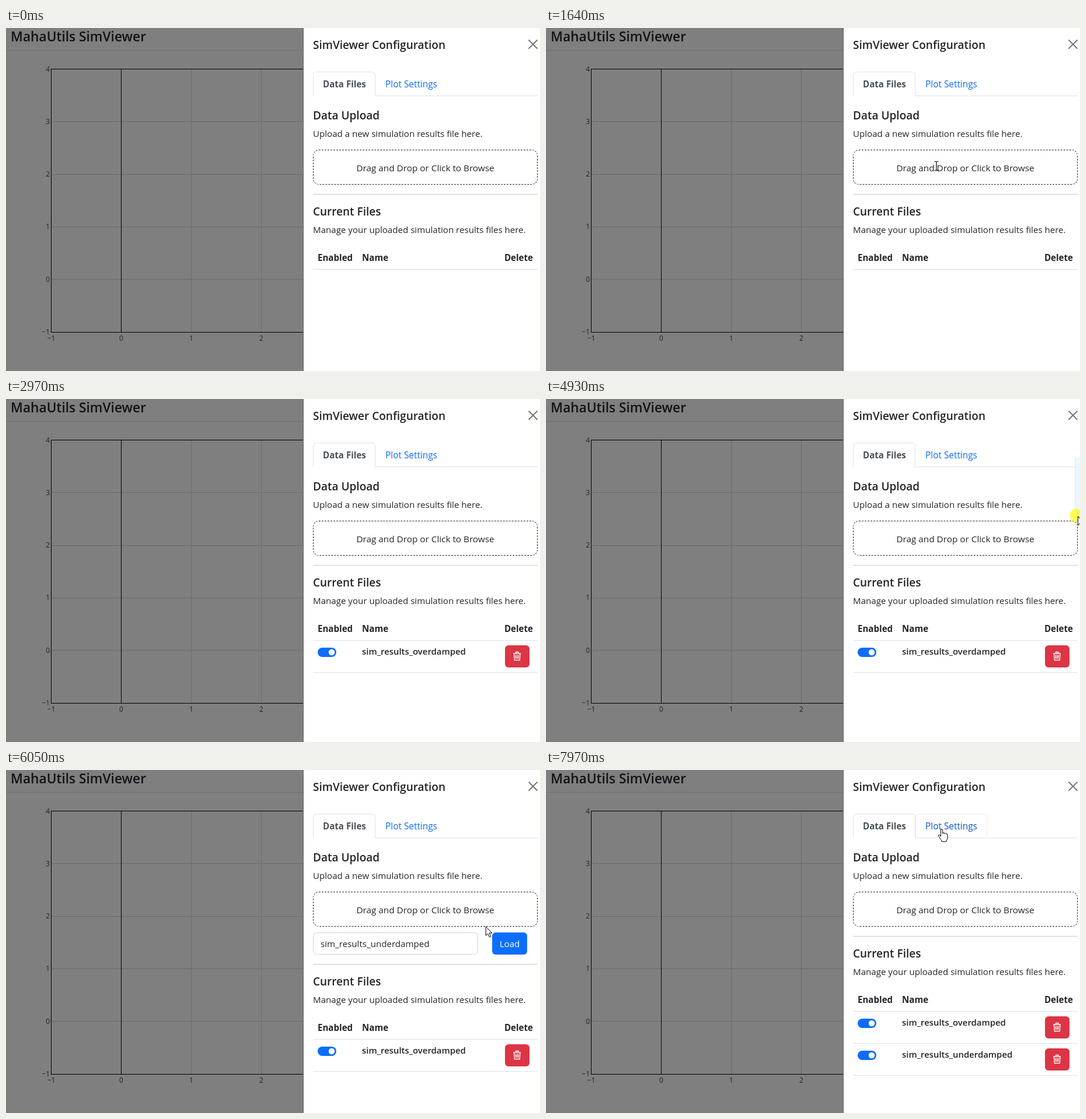
Recreate the animation shown at these times as an HTML page. Size 915 by 589 pixels, loop 8000 ms.

```html
<!DOCTYPE html>
<html lang="en">
<head>
<meta charset="utf-8">
<title>SimViewer Configuration</title>
<style>
  html, body { margin: 0; width: 100%; height: 100%; overflow: hidden; background: #fff; }
  svg { display: block; width: 915px; height: 589px; }
  text { font: 15.1px "Open Sans", "Noto Sans", sans-serif; fill: #212529; }
  .title { font-size: 22.7px; font-weight: 600; fill: #111315; }
  .head { font-size: 19px; font-weight: 600; }
  .bold { font-weight: 700; }
  .name { font-size: 14.9px; font-weight: 600; }
  .axes text { font-size: 12px; fill: #222; }
  .mid { text-anchor: middle; }
  .line { stroke: #dee2e6; fill: none; }
  .cursor { fill: #fff; stroke: #000; }
  #zone { box-sizing: border-box; height: 60px; border: 1px dashed #212529; border-radius: 10px; }
  #zone.hot { border: 1px solid #6c6; background: #eee; }
</style>
</head>
<body>
<svg viewBox="0 0 915 589">
  <defs>
    <g id="row">
      <rect x="534" y="427" width="32" height="16" rx="8" fill="#0d6efd"/>
      <circle cx="558" cy="435" r="5.25" fill="#fff"/>
      <rect x="855" y="423" width="42" height="38" rx="6" fill="#dc3545"/>
      <path d="M869 437h13M873.500 437v-2.500h4.500v2.500M870.500 437l.8 11.500h8.900l.8-11.500M873.200 439.500l.3 6.500M875.700 439.500v6.500M878.200 439.500l-.3 6.500"
            fill="none" stroke="#fff" stroke-width="1.300"/>
      <path class="line" d="M526 469.5h385"/>
    </g>
  </defs>

  <rect width="510" height="589" fill="#7f7f7f"/>
  <text class="title" x="8" y="22.500">MahaUtils SimViewer</text>
  <path d="M0 38.5h510" stroke="#6f6f6f"/>
  <g id="axes" class="axes"></g>
  <path d="M509.500 0V589" stroke="#666"/>
  <rect x="510" width="405" height="589" fill="#fff"/>

  <text class="head" x="526" y="36">SimViewer Configuration</text>
  <path d="M895.5 20.5l15 15m0-15l-15 15" stroke="#777" stroke-width="2"/>
  <path class="line" d="M526.5 117V81.500q0-6 6-6h94q6 0 6 6v35H911"/>
  <path id="tab" d="M633.500 116V81.500q0-6 6-6h110q6 0 6 6v35" fill="none" stroke="#e9ecef"/>
  <text class="bold" x="543" y="102" style="fill:#495057">Data Files</text>
  <text id="link" x="650" y="102" style="font-size:15.4px">Plot Settings</text>

  <text class="head" x="526" y="157">Data Upload</text>
  <text x="526" y="187">Upload a new simulation results file here.</text>
  <foreignObject x="526" y="209" width="385" height="60"><div id="zone"></div></foreignObject>
  <text class="mid" x="718.5" y="246" style="font-size:15.3px">Drag and Drop or Click to Browse</text>

  <g id="loader">
    <rect x="526.5" y="279.5" width="282" height="37" rx="6" fill="#fff" stroke="#ced4da"/>
    <text id="file" x="539" y="304"></text>
    <rect id="load" x="833" y="279" width="60" height="38" rx="6"/>
    <text class="mid" x="863" y="304" style="fill:#fff">Load</text>
  </g>

  <g id="files">
    <path d="M526 285.5h385" stroke="#c8c9ca"/>
    <text class="head" x="526" y="322">Current Files</text>
    <text x="526" y="352">Manage your uploaded simulation results files here.</text>
    <text class="bold" x="534" y="400">Enabled</text>
    <text class="bold" x="610" y="400">Name</text>
    <text class="bold" x="903" y="400" text-anchor="end">Delete</text>
    <path class="line" d="M526 414.5h385"/>
    <g id="over"><use href="#row"/><text class="name" x="610" y="439">sim_results_overdamped</text></g>
    <g id="under"><use href="#row" y="55"/><text class="name" x="610" y="494">sim_results_underdamped</text></g>
  </g>

  <rect id="ghost" width="74" height="92" fill="#e5f5fc" stroke="#d0e9f5" opacity=".75"/>
  <g id="pointer">
    <circle id="press" cx="-2" cy="-1" r="11.500" fill="#ff0" opacity=".7"/>
    <path id="arrow" class="cursor" d="M.5 .5v15.500l3.500-3.400 2.700 5.900 2.400-1.100-2.700-5.800h4.800z"/>
    <path id="ibeam" d="M-3.500-7.500h3l.5.5.5-.5h3M0-7V7M-3.500 7.500h3l.5-.5.5.5h3" fill="none" stroke="#000" stroke-width="1.200"/>
    <path id="hand" class="cursor" d="M-1.500 13V2q0-1.500 1.600-1.500T1.700 2v6q.2-1.300 1.500-1.300T4.700 8.300q.3-1.100 1.500-1t1.400 1.500q2.400-.6 2.400 1.700v5q0 3-2 4.500v2h-8v-2q-1.500-1-2.600-3.500l-2.700-4q-1-2 .5-2.300 1.200-.1 3.300 2.800z"/>
  </g>
</svg>
<script>
const $ = id => document.getElementById(id);
const show = (id, on) => $(id).style.display = on ? "" : "none";

function drawAxes() {
  let out = "";
  const label = n => String(n).replace("-", "−");
  for (let i = 0; i < 6; i++) {
    const y = 522 - i * 90.3;
    out += `<path d="M78 ${Math.floor(y) + .5}H510" stroke="#6b6b6b"/>
      <text x="75" y="${y + 4}" text-anchor="end">${label(i - 1)}</text>`;
  }
  for (let i = 0; i < 4; i++) {
    const x = 77.5 + i * 120;
    out += `<path d="M${x} 70V522" stroke="${i < 2 ? "#000" : "#6b6b6b"}"/>
      <text class="mid" x="${x}" y="537">${label(i - 1)}</text>`;
  }
  $("axes").innerHTML = out + '<path d="M77 70.500H510M77 522.500H510" stroke="#000"/>';
}

// Pointer stops: time, x, y
const stops = [
  [730, 800, 228], [1150, 669, 237], [1660, 669, 237], [2350, 858, 296],
  [2560, 858, 296], [2780, 889, 276], [2930, 889, 276], [2950, 893, 278],
  [4930, 911, 201], [5170, 770, 232], [5660, 770, 232], [6360, 858, 294],
  [7040, 858, 294], [7200, 852, 328], [7760, 678, 105], [7850, 678, 105], [7940, 678, 101]
];

function pointerAt(t) {
  const next = stops.findIndex(s => s[0] > t);
  if (next < 1) return stops[next ? stops.length - 1 : 0].slice(1);
  const [t0, x0, y0] = stops[next - 1], [t1, x1, y1] = stops[next];
  const u = (t - t0) / (t1 - t0), k = u * u * (3 - 2 * u);
  return [x0 + (x1 - x0) * k, y0 + (y1 - y0) * k];
}

function render(t) {
  const during = (a, b) => t >= a && t < b;
  const [x, y] = pointerAt(t);
  const inside = (l, top, r, b) => x >= l && x <= r && y >= top && y <= b;
  const visible = during(730, 2970) || t >= 4930;
  const dragging = during(730, 1580) || during(4930, 5560);
  const hot = (dragging && y >= 209) || during(5560, 5700);
  const loading = during(1720, 2770) || during(5800, 6690);
  const onLoad = loading && inside(833, 279, 893, 317);
  const onText = inside(601, 226, 837, 254) || (loading && inside(526, 279, 809, 317));
  const kind = dragging ? "arrow" : onLoad || y < 117 ? "hand" : onText ? "ibeam" : "arrow";

  $("zone").className = hot ? "hot" : "";
  show("loader", loading);
  $("file").textContent = t < 4000 ? "sim_results_overdamped" : "sim_results_underdamped";
  $("load").setAttribute("fill", onLoad ? "#0b5ed7" : "#0d6efd");
  $("files").setAttribute("transform", `translate(0 ${loading ? 48 : 0})`);
  show("over", t >= 2680);
  show("under", t >= 6620);

  const hover = Math.min(1, Math.max(0, (t - 7850) / 110));
  $("tab").style.opacity = hover;
  $("link").style.fill = `rgb(${13 - 3 * hover},${110 - 22 * hover},${253 - 51 * hover})`;

  show("ghost", dragging);
  $("ghost").setAttribute("transform", `translate(${x - 4.5} ${y - (hot ? 94 : 99.5)})`);
  show("pointer", visible);
  $("pointer").setAttribute("transform", `translate(${x} ${y})`);
  show("press", dragging || during(2450, 2560) || during(6510, 6600));
  for (const id of ["arrow", "ibeam", "hand"]) show(id, id === kind);
}

function tick() {
  render(performance.now() % 8000);
  requestAnimationFrame(tick);
}
drawAxes();
tick();
</script>
</body>
</html>
```
